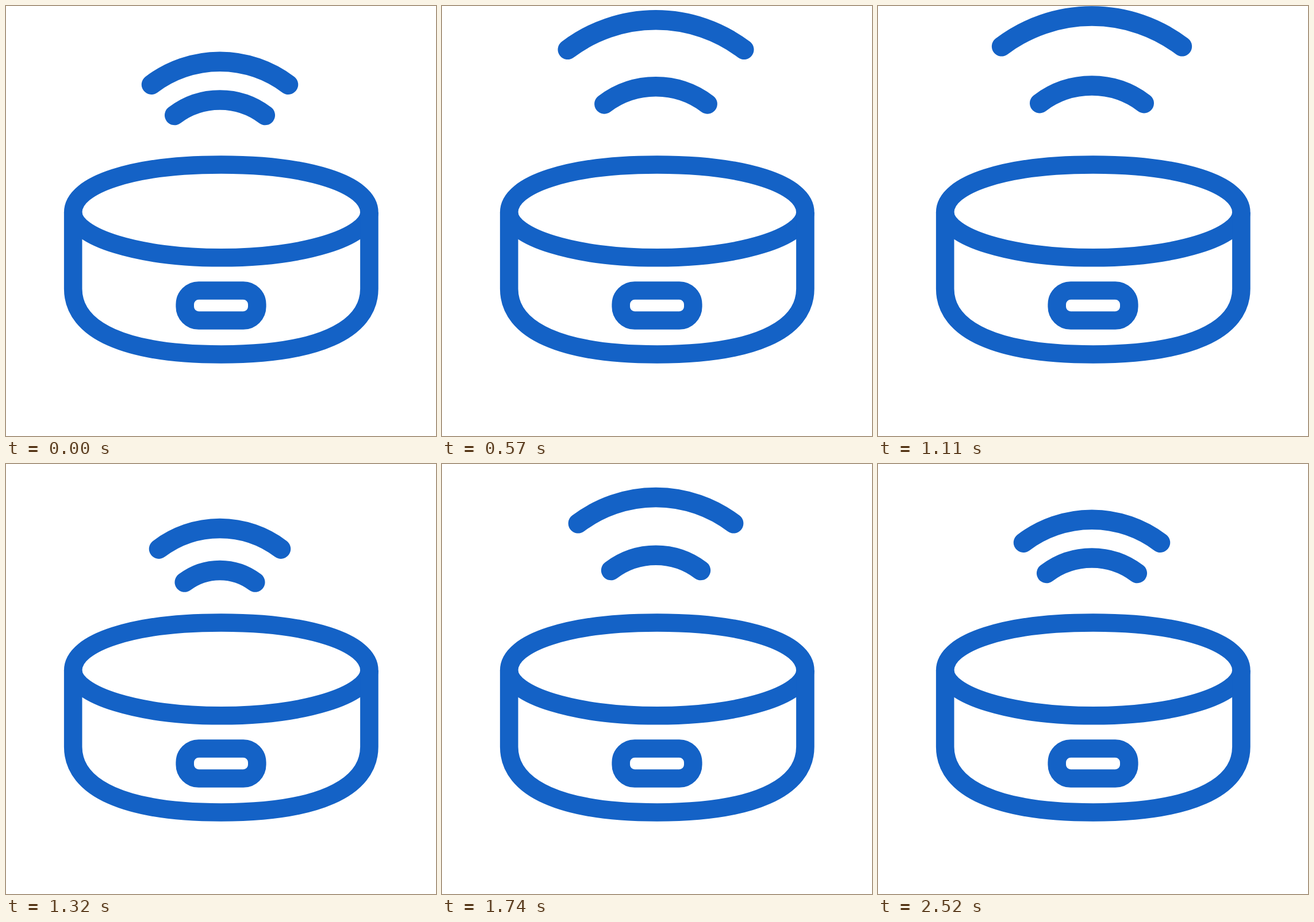
Animation of 748 by 748 pixels, one loop 2550 ms. Source, as an HTML page:

```html
<!DOCTYPE html>
<html lang="en">
<head>
<meta charset="utf-8">
<title>Signal device</title>
<style>
  html, body { margin: 0; width: 100%; height: 100%; overflow: hidden; background: #fff; }
  svg { display: block; width: 100vw; height: 100vh; }
</style>
</head>
<body>
<svg viewBox="0 0 748 748" fill="none" stroke="#1462c6" stroke-width="31.6">
  <path id="rim"/>
  <path id="wall"/>
  <rect id="button" height="52" rx="24"/>
  <g stroke-width="34.5" stroke-linecap="round">
    <path id="outer"/>
    <path id="inner"/>
  </g>
</svg>
<script>
const LOOP = 2550, STEP = 30;
const BEATS = [420, 945, 1470];
const SIN = 0.604, COS = 0.797, CX = 374.3;
const el = id => document.getElementById(id);

// Wave keys: [time, radius, centre y]
function waveKeys(rest, low, mid, push, peak, settle, settleAt, end) {
  const keys = [[300, ...rest]];
  BEATS.forEach((b, i) => {
    if (i) keys.push([b - 15, ...mid]);
    keys.push([b + 60, ...push], [b + 180, ...peak], [b + 375, ...low]);
  });
  keys.push([settleAt, ...settle], [end, ...rest]);
  return keys;
}
const waves = {
  outer: waveKeys([197, 293.7], [175.5, 287.5], [202.5, 285], [209.4, 284], [262, 277], [230, 303], 2125, 2460),
  inner: waveKeys([130.5, 294], [101.5, 286.5], [132, 287.5], [135, 287.5], [151, 289], [153, 303.5], 2030, 2530)
};

function sample(keys, t) {
  const i = keys.findIndex(k => k[0] > t);
  if (i === 0) return keys[0].slice(1);
  if (i < 0) return keys[keys.length - 1].slice(1);
  const a = keys[i - 1], b = keys[i];
  const p = (t - a[0]) / (b[0] - a[0]), e = p * p * (3 - 2 * p);
  return [1, 2].map(n => a[n] + (b[n] - a[n]) * e);
}

function squash(t) {
  return BEATS.reduce((sum, b) => {
    const d = Math.abs(t - b) / 87;
    return sum + (d < 1 ? 1.07 * Math.cos(d * Math.PI / 2) ** 2 : 0);
  }, 0);
}

function drawWave(id, t) {
  const [r, cy] = sample(waves[id], t);
  const dx = r * SIN, y = cy - r * COS;
  el(id).setAttribute('d', `M${372 - dx} ${y}A${r} ${r} 0 0 1 ${372 + dx} ${y}`);
}

// Half an oval from (CX - rx, y) to (CX + rx, y); k sets how full its shoulders are
function bow(rx, y, ry, k) {
  const l = CX - rx, r = CX + rx, m = y + ry, c = y + k * ry;
  return `C${l} ${c} ${CX - k * rx} ${m} ${CX} ${m}S${r} ${c} ${r} ${y}`;
}

function drawBody(q) {
  const rx = 257.6 + 8 * q, l = CX - rx, r = CX + rx, y = 359 + 15 * q;
  el('rim').setAttribute('d', `M${l} ${y}${bow(rx, y, -83, 0.59)}${bow(-rx, y, 78.8, 0.552)}Z`);
  el('wall').setAttribute('d', `M${l} ${y}V492${bow(rx, 492, 114, 0.64)}V${y}`);
  const w = 62.8 + 7.7 * q, b = el('button');
  b.setAttribute('x', 374 - w);
  b.setAttribute('width', 2 * w);
  b.setAttribute('y', 495 + 8 * q);
}

function draw(now) {
  const t = Math.floor((now % LOOP) / STEP) * STEP;
  drawBody(squash(t));
  drawWave('outer', t);
  drawWave('inner', t);
}

let start;
function tick(now) {
  start ??= now;
  draw(now - start);
  requestAnimationFrame(tick);
}
draw(0);
requestAnimationFrame(tick);
</script>
</body>
</html>
```
